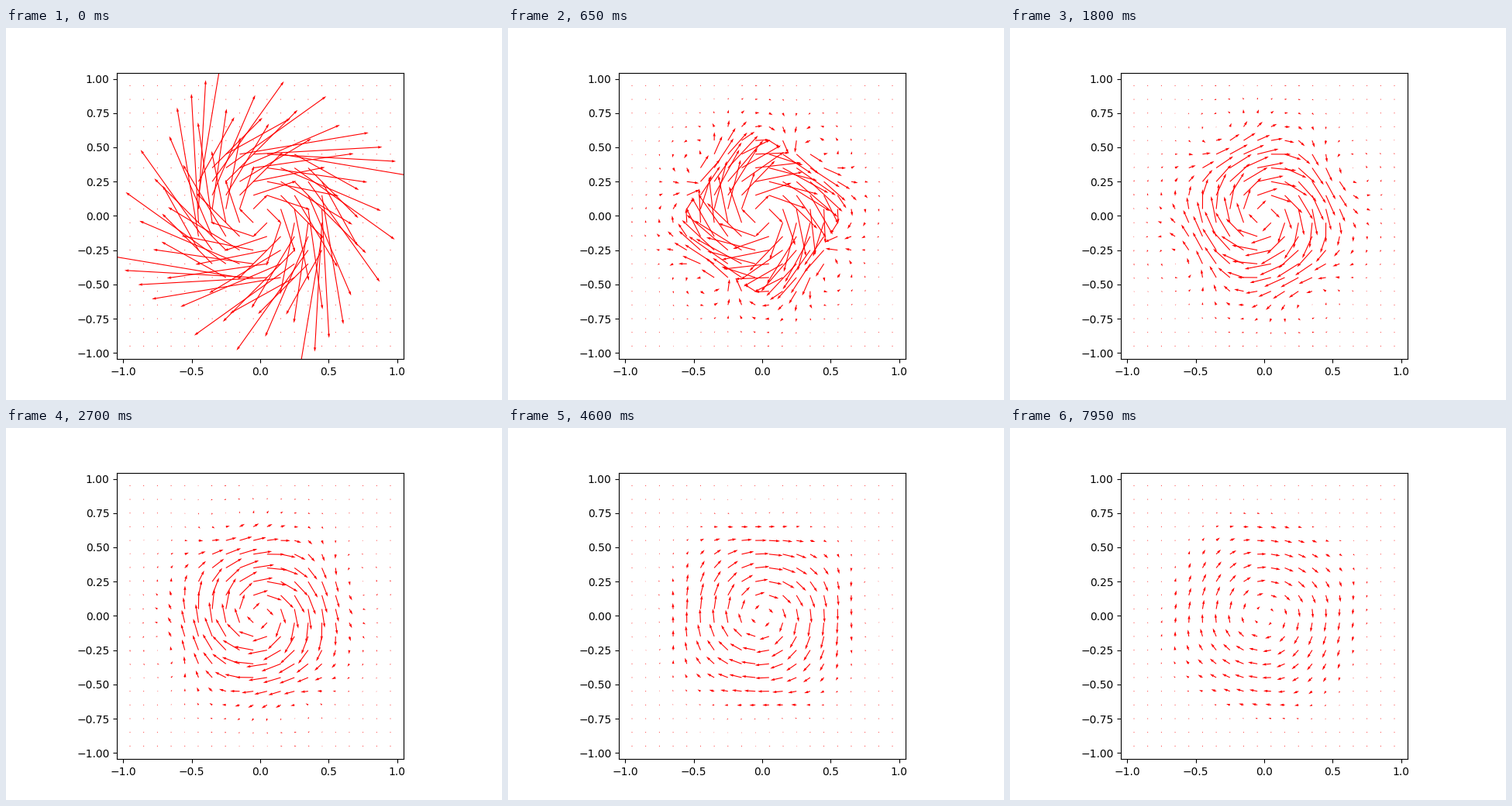
Write a matplotlib script that moves like this. It is 640 by 480 pixels and loops after 8 s.

```python
import numpy as np
import matplotlib.pyplot as plt
from matplotlib.animation import FuncAnimation

N = 20          # cells per side
H = 2 / N       # cell size
DT = 0.25
FRAMES = 160

nodes = np.linspace(-1, 1, N + 1)
mids = (nodes[1:] + nodes[:-1]) / 2
UX, UY = np.meshgrid(nodes, mids)   # faces carrying the horizontal speed
VX, VY = np.meshgrid(mids, nodes)   # faces carrying the vertical speed


def pressure_solver():
    line = 2 * np.eye(N) - np.eye(N, k=1) - np.eye(N, k=-1)
    line[0, 0] = line[-1, -1] = 1
    eye = np.eye(N)
    return np.linalg.pinv(np.kron(eye, line) + np.kron(line, eye))


SOLVE = pressure_solver()


def sample(grid, x, y, x0, y0):
    """Bilinear lookup in a grid whose first entry lies at (x0, y0)."""
    rows, cols = grid.shape
    gx = np.clip((x - x0) / H, 0, cols - 1)
    gy = np.clip((y - y0) / H, 0, rows - 1)
    i = np.minimum(gx.astype(int), cols - 2)
    j = np.minimum(gy.astype(int), rows - 2)
    fx, fy = gx - i, gy - j
    low = grid[j, i] * (1 - fx) + grid[j, i + 1] * fx
    high = grid[j + 1, i] * (1 - fx) + grid[j + 1, i + 1] * fx
    return low * (1 - fy) + high * fy


def velocity(u, v, x, y):
    return (sample(u, x, y, -1, mids[0]),
            sample(v, x, y, mids[0], -1))


def advect(u, v):
    au, av = velocity(u, v, UX, UY)
    bu, bv = velocity(u, v, VX, VY)
    return (sample(u, UX - DT * au, UY - DT * av, -1, mids[0]),
            sample(v, VX - DT * bu, VY - DT * bv, mids[0], -1))


def project(u, v):
    u[:, [0, -1]] = 0
    v[[0, -1]] = 0
    div = np.diff(u, axis=1) + np.diff(v, axis=0)
    p = -(SOLVE @ div.ravel()).reshape(N, N)
    u[:, 1:-1] -= np.diff(p, axis=1)
    v[1:-1] -= np.diff(p, axis=0)
    return u, v


def centred(u, v):
    return (u[:, 1:] + u[:, :-1]) / 2, (v[1:] + v[:-1]) / 2


def simulate():
    u = np.where(np.hypot(UX, UY) < 0.5, UY, 0.0)
    v = np.where(np.hypot(VX, VY) < 0.5, -VX, 0.0)
    states = [centred(u, v)]
    while len(states) < FRAMES:
        u, v = project(*advect(u, v))
        states.append(centred(u, v))
    return states


states = simulate()

fig, ax = plt.subplots(figsize=(6.4, 4.8), dpi=100)
ax.set_aspect("equal")
arrows = ax.quiver(mids, mids, *states[0], color="red", scale=1)


def draw(i):
    arrows.set_UVC(*states[i])
    return (arrows,)


anim = FuncAnimation(fig, draw, frames=FRAMES, interval=50, repeat=True)
plt.show()
```
